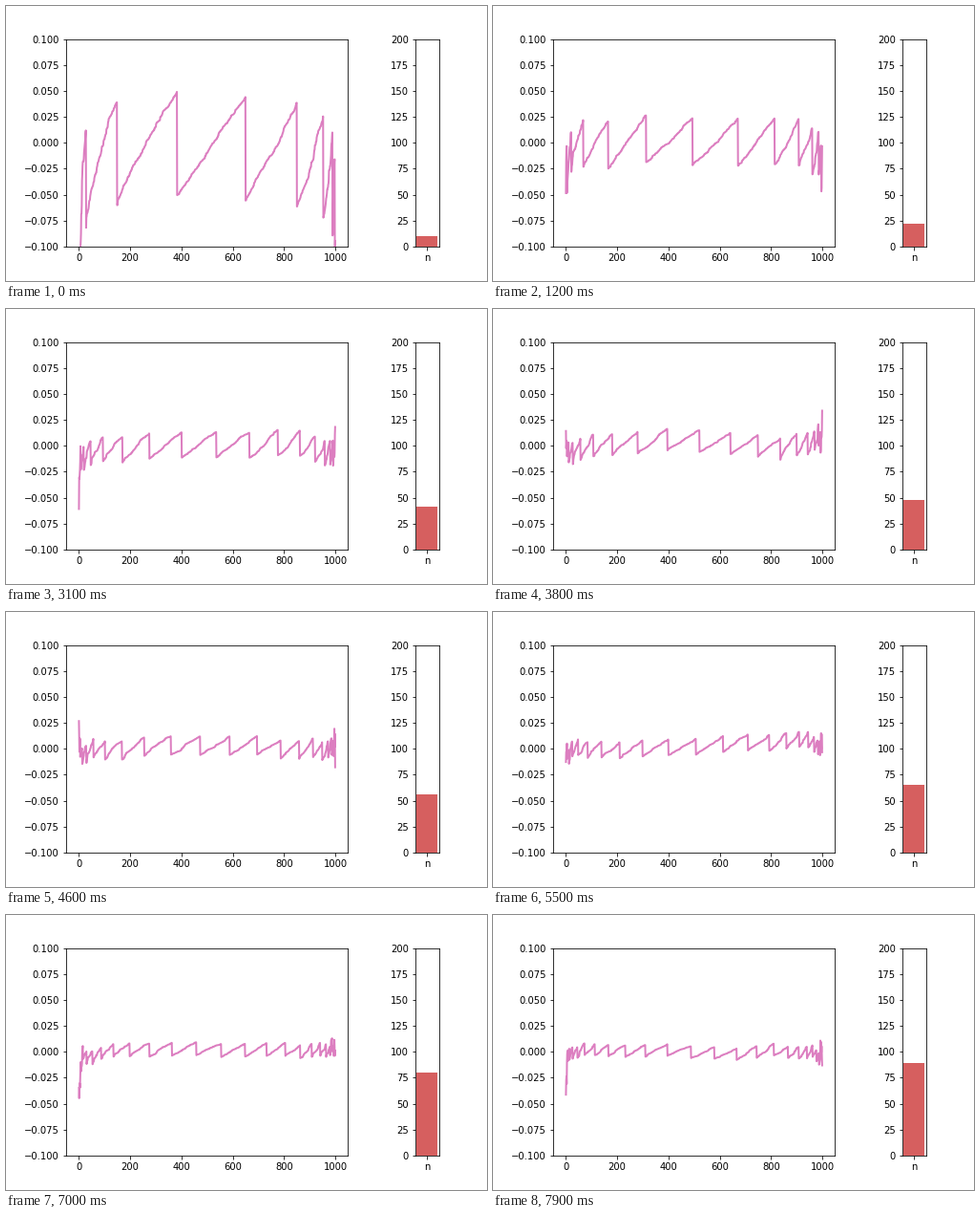
These frames come from a looping animation (504x288 px, 8 s). A matplotlib script:

```python
"""Sorted normal samples minus binomial quantiles, for a growing number of trials n."""
from math import comb, sqrt

import matplotlib.pyplot as plt
import numpy as np
from matplotlib.animation import FuncAnimation

W, H, DPI = 504, 288, 72
P, SIZE = 0.3, 1000
FIRST, FRAMES, INTERVAL = 10, 80, 100
PINK, RED = "#dc7ec0", "#d65f5f"

ranks = np.arange(SIZE)


def binomial_levels(n):
    """Binomial quantiles divided by n, one per rank."""
    pmf = [comb(n, k) * P**k * (1 - P)**(n - k) for k in range(n + 1)]
    return np.searchsorted(np.cumsum(pmf), (ranks + 0.5) / SIZE) / n


def normal_sample(n):
    """Sorted normal sample with the mean and spread of the binomial share."""
    rng = np.random.default_rng(n)
    return np.sort(rng.normal(P, sqrt(P * (1 - P) / n), SIZE))


def residual(n):
    return normal_sample(n) - binomial_levels(n)


def add_axes(left, width, top, bottom=0):
    ax = fig.add_axes([left / W, 0.125, width / W, 0.755])
    ax.set_ylim(bottom, top)
    return ax


fig = plt.figure(figsize=(W / DPI, H / DPI), dpi=DPI, facecolor="white")

line_ax = add_axes(63, 295.3, 0.1, -0.1)
line, = line_ax.plot(ranks, residual(FIRST), color=PINK, lw=2)

bar_ax = add_axes(429, 24.6, 200)
bar = bar_ax.bar(["n"], [FIRST], color=RED)[0]


def update(i):
    n = FIRST + i
    line.set_ydata(residual(n))
    bar.set_height(n)
    return line, bar


anim = FuncAnimation(fig, update, frames=FRAMES, interval=INTERVAL,
                     repeat=True, repeat_delay=0)
plt.show()
```
